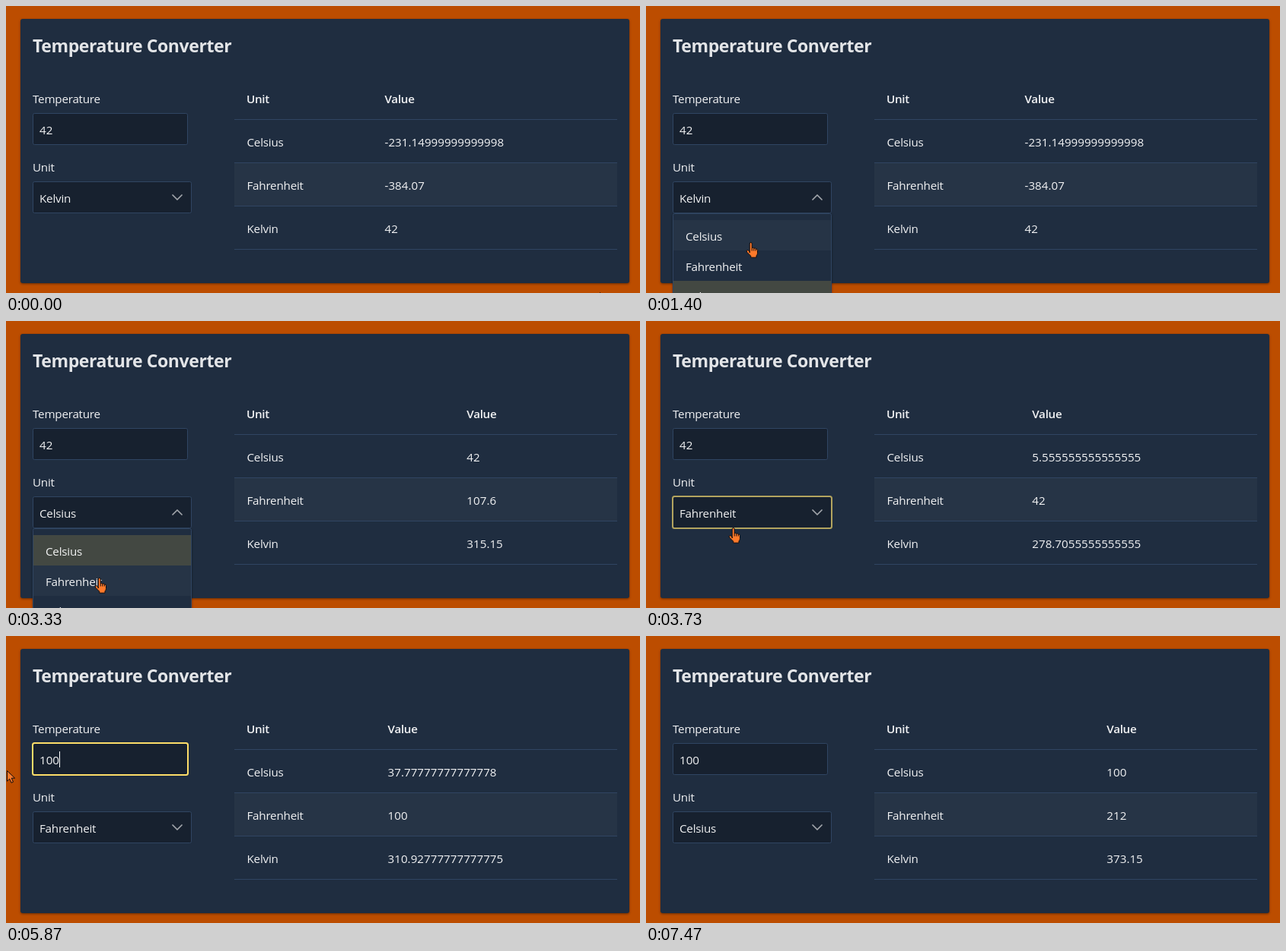
These frames come from a looping animation (833 px wide and 378 px high, 7.94 s). An HTML page:

```html
<!DOCTYPE html>
<html lang="en">
<head>
<meta charset="utf-8">
<title>Temperature Converter</title>
<style>
html, body { margin: 0; width: 100%; height: 100%; overflow: hidden; background: #bc4d00; }
svg { display: block; width: 833px; height: 378px; }
text { font: 15.2px "Open Sans", "Noto Sans", sans-serif; fill: #fff; fill-opacity: .94; white-space: pre; }
.word { letter-spacing: -.22px; }
.head { font-weight: 600; letter-spacing: -.3px; }
.title { font-size: 23px; font-weight: 700; letter-spacing: -.4px; fill-opacity: .88; }
.raised { filter: drop-shadow(0 1px 1.5px rgba(0, 0, 0, .45)); }
.field { fill: #17212f; stroke: #304562; }
.ring { fill: none; stroke: #fddd68; stroke-width: 2; }
.pointer { fill: #ff7a2b; stroke: #0c0c10; stroke-linejoin: round; }
</style>
</head>
<body>
<svg viewBox="0 0 833 378">
  <rect class="raised" x="19" y="17" width="800" height="348" rx="3" fill="#1f2d40"/>
  <text class="title" x="35" y="61">Temperature Converter</text>

  <rect x="300" y="207" width="503" height="56" fill="#fff" fill-opacity=".03"/>
  <path d="M300 149.5h503M300 206.5h503M300 263.5h503M300 320.5h503" stroke="#304562"/>
  <text class="head" x="316" y="128">Unit</text>
  <text class="word" x="316.5" y="185">Celsius</text>
  <text class="word" x="316.5" y="242">Fahrenheit</text>
  <text class="word" x="316.5" y="299">Kelvin</text>
  <text class="head value" y="128">Value</text>
  <text class="value" y="185"></text>
  <text class="value" y="242"></text>
  <text class="value" y="299"></text>

  <text class="word" x="35" y="128">Temperature</text>
  <rect class="field" x="35.5" y="141.5" width="203" height="41" rx="2"/>
  <rect class="ring" id="inputRing" x="35" y="141" width="204" height="42" rx="2.5"/>
  <rect id="selection" x="44" y="152" width="17" height="21" fill="#165c6e"/>
  <text id="input" x="44" y="169"></text>
  <rect id="caret" y="152" width="1" height="21" fill="#fff"/>

  <text class="word" x="35" y="218">Unit</text>
  <rect class="field" x="35.5" y="231.5" width="208" height="41" rx="2"/>
  <rect class="ring" id="selectRing" x="35" y="231" width="209" height="42" rx="2.5"/>
  <text class="word" id="select" x="44" y="259"></text>
  <path id="chevron" fill="none" stroke="#fff" stroke-opacity=".6" stroke-width="1.7" stroke-linecap="round" stroke-linejoin="round"/>

  <g id="menu">
    <rect class="raised" x="35.5" y="273.5" width="208" height="140" rx="2" fill="#1f2d40" stroke="#304562"/>
    <rect class="item" x="36" y="282" width="207" height="40"/>
    <rect class="item" x="36" y="322" width="207" height="40"/>
    <rect class="item" x="36" y="362" width="207" height="40"/>
    <text class="word" x="52" y="309">Celsius</text>
    <text class="word" x="52" y="349">Fahrenheit</text>
    <text class="word" x="52" y="388">Kelvin</text>
  </g>

  <path class="pointer" id="pointer"/>
</svg>
<script>
const LOOP = 7940;
const units = ['Celsius', 'Fahrenheit', 'Kelvin'];

// start time, chosen unit, typed number, table values
const states = [
  [0, 2, '42', ['-231.14999999999998', '-384.07', '42']],
  [1870, 0, '42', ['42', '107.6', '315.15']],
  [3600, 1, '42', ['5.555555555555555', '42', '278.7055555555555']],
  [4800, 1, '1', ['-17.22222222222222', '1', '255.92777777777775']],
  [5000, 1, '10', ['-12.22222222222222', '10', '260.92777777777775']],
  [5270, 1, '100', ['37.77777777777778', '100', '310.92777777777775']],
  [7130, 0, '100', ['100', '212', '373.15']]
];

// time, x, y of the pointer tip
const path = [
  [0, 780, 377], [270, 590, 285], [470, 400, 220], [600, 270, 193], [800, 165, 250],
  [930, 160, 255], [1400, 137, 311], [1800, 137, 311], [2330, 154, 254], [2730, 154, 254],
  [3330, 122, 338], [3530, 122, 338], [3870, 108, 225], [4070, 82, 168], [4200, 55, 166],
  [4330, 13, 172], [4470, 1, 177], [6000, 1, 177], [6270, 160, 228], [6400, 240, 250],
  [6800, 145, 303], [7070, 145, 303], [7400, 118, 385], [LOOP, 118, 385]
];

const menuTimes = [[870, 1870], [2800, 3600], [6400, 7130]];
const selectFocus = [[730, 1070], [1930, 2870], [3600, 3800], [6330, 6530], [7130, 7270]];
const inputFocus = [[4070, 6330]];

const shapes = {
  arrow: 'M.5 .5V14.2L3.7 11.2 6 16.3 8.5 15.2 6.2 10.2H10.6Z',
  hand: 'M-.8 14V2q0-1.5 1.5-1.5T2.2 2V7.5q2-.6 2.6.6 2-.5 2.5.7 2-.2 2.2 1.6v4q0 2-1.5 3.5v2.3H.7v-2L-4 13.5q-1.6-2-.3-2.8 1.2-.5 3.5 1.6zM2.2 7.5v4M4.8 8.1v3.4M7.3 8.8v2.7',
  beam: 'M-3.5-8.5h7v2H1v13h2.5v2h-7v-2H-1v-13h-2.5z'
};

const $ = id => document.getElementById(id);
const values = document.querySelectorAll('.value');
const items = document.querySelectorAll('.item');
const clamp = v => Math.max(0, Math.min(1, v));
const during = (t, from, to) => t >= from && t < to;

// fades in after the start and out after the end of each span
const fade = (t, spans, rise, fall) => Math.max(...spans.map(([from, to]) =>
  Math.min(clamp((t - from) / rise), 1 - clamp((t - to) / fall))));

function pointerAt(t) {
  const i = path.findIndex(p => p[0] > t);
  const [t0, x0, y0] = path[i - 1], [t1, x1, y1] = path[i];
  const k = (t - t0) / (t1 - t0);
  return [x0 + (x1 - x0) * k, y0 + (y1 - y0) * k];
}

// columns share the table width in proportion to their content
function valueX(list) {
  const width = s => [...s].reduce((w, c) => w + (c === '-' ? 6.4 : c === '.' ? 3.5 : 8.62), 0);
  return 315.7 + 503 * 106.7 / (138.7 + Math.max(...list.map(width)));
}

function draw(t) {
  const [, unit, typed, list] = states.findLast(s => s[0] <= t);
  const x = valueX(list);
  values.forEach((el, i) => {
    el.setAttribute('x', x);
    if (i) el.textContent = list[i - 1];
  });
  $('input').textContent = typed;
  $('select').textContent = units[unit];

  $('inputRing').style.opacity = fade(t, inputFocus, 200, 200);
  $('selectRing').style.opacity = fade(t, selectFocus, 200, 200);
  $('selection').style.opacity = +during(t, 4200, 4800);
  $('caret').setAttribute('x', 44 + Math.round(typed.length * 8.62));
  $('caret').style.opacity = +(during(t, 4800, 5330) || during(t, 5870, 6330));

  const open = menuTimes.some(([from, to]) => during(t, from, to));
  const shown = fade(t, menuTimes, 120, 100);
  const scale = open ? .8 + .2 * shown : 1;
  $('menu').style.opacity = shown;
  $('menu').setAttribute('transform', `translate(0 ${273 * (1 - scale)}) scale(1 ${scale})`);
  $('chevron').setAttribute('d', open ? 'M219 255l6-6 6 6' : 'M219 249l6 6 6-6');

  const [px, py] = pointerAt(t);
  const inColumn = px > 35 && px < 244;
  const hovered = inColumn ? Math.floor((py - 282) / 40) : -1;
  items.forEach((el, i) => el.setAttribute('fill',
    i === unit ? 'rgba(255,213,79,.16)' : i === hovered ? 'rgba(255,255,255,.03)' : 'none'));

  const onSelect = inColumn && py > 231 && (py < 273 || shown > 0);
  const onInput = inColumn && px < 239 && py > 141 && py < 183;
  $('pointer').setAttribute('d', shapes[onSelect ? 'hand' : onInput ? 'beam' : 'arrow']);
  $('pointer').setAttribute('transform', `translate(${Math.round(px)} ${Math.round(py)})`);
}

// the picture advances 15 times a second
function tick() {
  const step = Math.floor((performance.now() % LOOP + 3.4) / (1000 / 15));
  draw(Math.min(Math.round(step * 100 / 15) * 10, LOOP - 10));
  requestAnimationFrame(tick);
}
tick();
</script>
</body>
</html>
```
